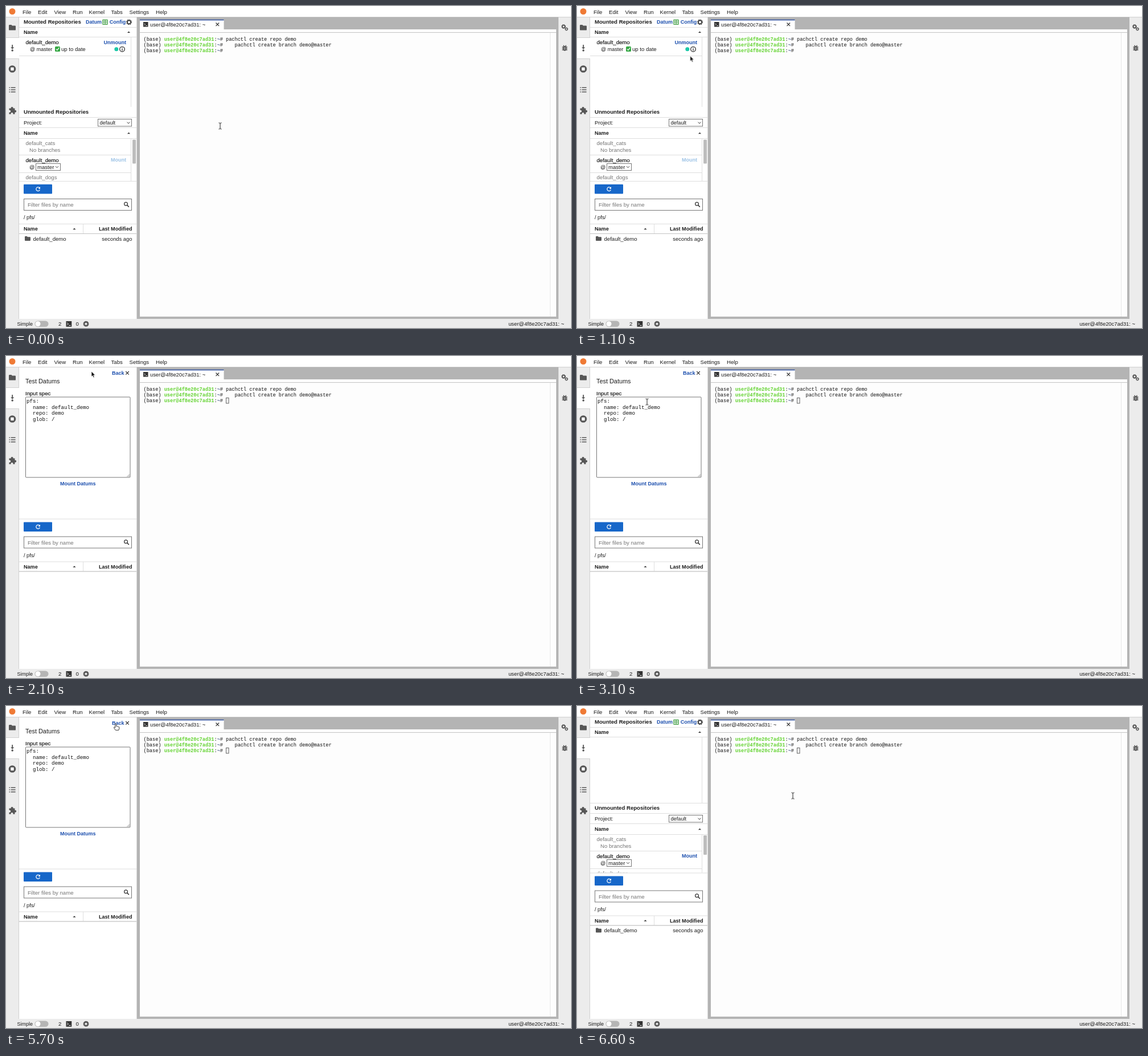
Write an HTML page that moves like this. It is 992x565 px and loops after 6.7 s.

```html
<!DOCTYPE html>
<html lang="en">
<head>
<meta charset="utf-8">
<title>Mounted repositories</title>
<style>
html, body { margin: 0; width: 100%; height: 100%; overflow: hidden; background: #fff; }
svg { display: block; width: 992px; height: 565px; }
text { font: 9.6px "Liberation Sans", Arial, sans-serif; fill: #1c1c1c; white-space: pre; }
.b { font-weight: 700; font-size: 9.1px; }
.title { font-weight: 700; font-size: 9.6px; }
.link { font-weight: 700; font-size: 9px; fill: #1c4fae; }
.off { fill: #9dc3e6; }
.dim { fill: #757575; }
.med { stroke: #1c1c1c; stroke-width: .2; }
.s92 { font-size: 9.2px; }
.end { text-anchor: end; }
.term text { font: 8.6px "Liberation Mono", monospace; fill: #111; }
.term .host { font-weight: 700; fill: #62d32f; }
.term .path { font-weight: 700; fill: #4a5f8f; }
.spec text { font: 9.17px "Liberation Mono", monospace; fill: #111; }
.rule { stroke: #dedede; fill: none; }
.icon { fill: #565656; }
.line { fill: none; stroke: #565656; stroke-width: 1.4; }
.box { fill: #fff; stroke: #777; }

/* one 6.7 s loop */
.before, .datums, .after, .beam, .arrow, .hand, .block, .hollow {
  animation: 6.7s step-end infinite; visibility: hidden;
}
.before { animation-name: before; }
.datums { animation-name: datums; }
.after { animation-name: after; }
.beam { animation-name: beam; }
.arrow { animation-name: arrow; }
.hand { animation-name: hand; }
.block { animation-name: block; }
.hollow { animation-name: hollow; }
.pointer { animation: move 6.7s ease-in-out infinite; }

@keyframes before { 0% { visibility: visible } 29.85%, 100% { visibility: hidden } }
@keyframes datums { 0%, 89.55%, 100% { visibility: hidden } 29.85% { visibility: visible } }
@keyframes after { 0% { visibility: hidden } 89.55%, 100% { visibility: visible } }
@keyframes beam {
  0%, 40.3%, 95.5%, 100% { visibility: visible }
  8.96%, 74.63% { visibility: hidden }
}
@keyframes arrow {
  0%, 20.15%, 40.3%, 80.6%, 95.5%, 100% { visibility: hidden }
  8.96%, 29.85%, 74.63%, 89.55% { visibility: visible }
}
@keyframes hand {
  0%, 29.85%, 89.55%, 100% { visibility: hidden }
  20.15%, 80.6% { visibility: visible }
}
@keyframes block { 0%, 11.94%, 100% { visibility: hidden } 2.99% { visibility: visible } }
@keyframes hollow { 0% { visibility: hidden } 23.88%, 100% { visibility: visible } }
@keyframes move {
  0%, 1.49% { transform: translate(376px, 210.5px) }
  11.94%, 14.93% { transform: translate(203px, 93px) }
  22.39%, 34.33% { transform: translate(150px, 27px) }
  43.28%, 49.25% { transform: translate(123px, 80.5px) }
  62.69%, 68.66% { transform: translate(97.5px, 108.5px) }
  82.09%, 92.54% { transform: translate(193px, 31px) }
  98.36%, 100% { transform: translate(379px, 157.5px) }
}
</style>
</head>
<body>
<svg viewBox="0 0 992 565">
<defs>
  <clipPath id="tall"><path d="M23 178h207v129H23z"/></clipPath>
  <clipPath id="short"><path d="M23 178h207v121.5H23z"/></clipPath>

  <g id="gear">
    <circle r="3.1" fill="none" stroke="#454545" stroke-width="1.9"/>
    <circle r="4.3" fill="none" stroke="#454545" stroke-width="1.3" stroke-dasharray="1.8 1.577"/>
  </g>
  <path id="folder" d="M0 1.2q0-1.2 1.2-1.2h3.3l1.4 1.4h4.900q1.200 0 1.200 1.200v5.800q0 1.200-1.200 1.200H1.200Q0 9.600 0 8.400z"/>
  <path id="up" d="M-2.600 1.300h5.200L0-1.300z" fill="#333"/>
  <path id="chevron" d="M-2.500-1.300 0 1.200l2.500-2.500" fill="none" stroke="#333"/>
  <path id="cross" d="M-2.800-2.800 2.800 2.800M2.800-2.800-2.800 2.800" stroke="#333" stroke-width="1.200"/>
  <g id="prompt">
    <rect width="8.500" height="8.500" fill="#333"/>
    <path d="M1.500 2.500 3.500 4.200l-2 1.800M4.300 6.500H7" fill="none" stroke="#fff" stroke-width=".8"/>
  </g>

  <g id="mountedHead">
    <text class="title" x="31" y="31.300">Mounted Repositories</text>
    <text class="link" x="140" y="31.300">Datum</text>
    <path d="M170 24.500h8v7.500h-8zM174 24.500v7.500M170 28.200h8" fill="none" stroke="#45a049" stroke-width="1.300"/>
    <text class="link" x="181.800" y="31.300">Config</text>
    <use href="#gear" x="216" y="28.300"/>
    <path class="rule" d="M23 37.500h206M23 54.500h206"/>
    <text class="b" x="31" y="49">Name</text>
    <use href="#up" x="215.500" y="45.800"/>
  </g>

  <g id="unmounted">
    <path class="rule" d="M23 177.500h206M23 195.500h206M23 213.500h206M23 232.500h206"/>
    <text class="title" x="31" y="189.300">Unmounted Repositories</text>
    <text x="31" y="207.500">Project:</text>
    <rect class="box" x="161.500" y="198.500" width="59" height="12.500"/>
    <text class="s92" x="164.500" y="208">default</text>
    <use href="#chevron" x="215" y="205"/>
    <text class="b" x="31" y="226">Name</text>
    <use href="#up" x="215.500" y="223"/>
    <path class="rule" d="M23 261.500h196M23 292.500h196M219.500 233v74"/>
    <text class="dim" x="34.500" y="244.300">default_cats</text>
    <text class="dim" x="41" y="256">No branches</text>
    <text class="med" x="34.500" y="273.500">default_demo</text>
    <text class="s92" x="41" y="286">@</text>
    <rect class="box" x="52.500" y="276.500" width="43" height="12"/>
    <text x="55" y="286">master</text>
    <use href="#chevron" x="89.500" y="282.500"/>
    <text class="dim" x="34.500" y="304.300">default_dogs</text>
  </g>

  <g id="files">
    <path class="rule" d="M23 307.500h206M23 382.500h206M23 399.500h206M135.500 382.500v17"/>
    <path d="M23 399.500h206" stroke="#c4c4c4"/>
    <rect x="31" y="313" width="50" height="16.500" rx="1" fill="#1767c9"/>
    <path d="M59 319.200A3.400 3.400 0 1 0 59.400 322.500" fill="none" stroke="#fff" stroke-width="1.200"/>
    <path d="M60 317.200v3.500h-3.500z" fill="#fff"/>
    <rect class="box" x="31.500" y="338.500" width="189" height="20"/>
    <text class="dim" x="38" y="352.200">Filter files by name</text>
    <circle cx="210.500" cy="347.300" r="2.900" fill="none" stroke="#333" stroke-width="1.200"/>
    <path d="m212.500 349.300 3.300 3.300" stroke="#333" stroke-width="1.500"/>
    <text class="s92" x="31" y="374">/ pfs/</text>
    <text class="b" x="31" y="394">Name</text>
    <use href="#up" x="120" y="391"/>
    <text class="b end" x="221.500" y="394">Last Modified</text>
  </g>
  <g id="fileRow">
    <use href="#folder" class="icon" transform="translate(33 404) scale(.83)"/>
    <text x="47.500" y="411.500">default_demo</text>
    <text class="end" x="221.500" y="411.500" style="font-size:9.400px">seconds ago</text>
  </g>
</defs>

<!-- menu bar -->
<circle cx="11" cy="9.500" r="5.500" fill="#ef7a35"/>
<text x="29" y="13.800">File</text>
<text x="56" y="13.800">Edit</text>
<text x="84.500" y="13.800">View</text>
<text x="117" y="13.800">Run</text>
<text x="145.500" y="13.800">Kernel</text>
<text x="184.500" y="13.800">Tabs</text>
<text x="216.500" y="13.800">Settings</text>
<text x="263" y="13.800">Help</text>

<!-- side bars and status bar -->
<path d="M0 19.500h23V549H0zM970 19.500h22V549h-22zM0 549h992v16H0z" fill="#ececec"/>
<path d="M0 19.500h992M22.500 19.500V56M22.500 92V549M0 55.500h22M0 92.500h22" stroke="#d0d0d0"/>
<path d="M0 56h23v36H0z" fill="#fff"/>
<use href="#folder" class="icon" x="5" y="33"/>
<g class="icon">
  <path d="M10.300 68h1.800v4.500h2.200l-3.100 3.200-3.100-3.200h2.200z"/>
  <circle cx="11.200" cy="78" r="1.800"/>
  <circle cx="11" cy="110.500" r="6.300"/>
  <rect x="8.300" y="107.800" width="5.400" height="5.400" rx=".6" fill="#fff"/>
  <path d="M5.500 179.500h3.200a2 2 0 1 1 3.800 0h3v3.300a2 2 0 1 1 0 3.800v3.200h-3.200a2 2 0 1 0-3.600 0H5.500v-3.300a2 2 0 1 0 0-3.700z"/>
</g>
<path class="line" d="M5.500 143.200h1.600m1.500 0h8M5.500 147h1.600m1.500 0h8M5.500 150.800h1.600m1.500 0h8"/>
<use href="#gear" transform="translate(979 36) scale(.78)"/>
<use href="#gear" transform="translate(984 40.500) scale(.6)"/>
<g class="icon">
  <ellipse cx="981" cy="74.500" rx="3" ry="4.300"/>
  <path class="line" stroke-width="1.100" d="M976.500 72h9M976.500 74.500h9M976.500 77h9M978.500 69l1.500 2M983.500 69l-1.500 2"/>
  <path d="M979.700 73.300h2.600m-2.600 2.300h2.600" stroke="#eee" stroke-width=".9"/>
</g>
<text x="19.500" y="561" style="font-size:9px">Simple</text>
<rect x="50.500" y="552.500" width="24" height="10.500" rx="5.200" fill="#b5b5b5"/>
<circle cx="56" cy="557.700" r="4.500" fill="#fff"/>
<text x="92" y="561">2</text>
<use href="#prompt" transform="translate(105.500 553) scale(1.150)"/>
<text x="122.500" y="561">0</text>
<rect x="137.200" y="554.500" width="6.600" height="6.600" rx="1" fill="none" stroke="#333" stroke-width="1.300"/>
<path d="M139.500 552.800v10m2.200-10v10M135.500 556.700h10m-10 2.300h10" stroke="#333" stroke-width=".9"/>
<rect x="139" y="556.300" width="3" height="3" fill="#ececec"/>
<text class="end" x="980" y="561" style="font-size:9.400px">user@4f8e20c7ad31: ~</text>

<!-- terminal dock -->
<path d="M229.500 19.500H970V549H229.500z" fill="#b4b4b4"/>
<path d="M235 41h731v504H235z" fill="#fdfdfd"/>
<path d="M235 24h147.500v18H235z" fill="#fff"/>
<path d="M235 24.500h147.500" stroke="#2d4f9e" stroke-width="1.600"/>
<path d="M235 46.500h731" stroke="#c4c4c4"/>
<path d="M955.500 47v498" stroke="#e6e6e6"/>
<use href="#prompt" x="241" y="28"/>
<text x="253" y="35.800" style="font-size:9.300px">user@4f8e20c7ad31: ~</text>
<use href="#cross" x="371.300" y="32.300"/>
<g class="term">
  <g id="ps">
    <text x="241.500" y="60.700">(base)</text>
    <text class="host" x="277.700" y="60.700">user@4f8e20c7ad31</text>
    <text x="365.500" y="60.700">:<tspan class="path">~</tspan>#</text>
  </g>
  <use href="#ps" y="10.300"/>
  <use href="#ps" y="20.600"/>
  <text x="386" y="60.700">pachctl create repo demo</text>
  <text x="401.500" y="71">pachctl create branch demo@master</text>
  <rect class="block" x="386" y="73" width="5.200" height="10.500" fill="#616161"/>
  <rect class="hollow" x="386.500" y="73.500" width="4.500" height="9.500" fill="none" stroke="#616161"/>
</g>

<!-- repository list with one mounted entry -->
<g class="before">
  <use href="#mountedHead"/>
  <path class="rule" d="M23 87.500h196M219.500 55v122"/>
  <text class="med" x="34.500" y="67.300">default_demo</text>
  <text class="link end" x="211" y="67">Unmount</text>
  <text x="42" y="79" style="font-size:9px">@ master</text>
  <rect x="86" y="71" width="9" height="9" rx="1.500" fill="#36a845"/>
  <path d="m88 75.600 1.900 2 3.300-4.400" fill="none" stroke="#fff" stroke-width="1.300"/>
  <text x="97" y="79">up to date</text>
  <circle cx="193.800" cy="75.800" r="3.500" fill="#1dc9a9"/>
  <circle cx="204" cy="75.800" r="4.300" fill="none" stroke="#222" stroke-width="1.200"/>
  <path d="M204 73v1.200m0 .8v3.400" stroke="#222" stroke-width="1.200"/>
  <g clip-path="url(#tall)">
    <use href="#unmounted"/>
    <text class="link off end" x="211" y="273">Mount</text>
    <rect x="222" y="234.500" width="6" height="42" rx="1" fill="#bdbdbd"/>
  </g>
  <use href="#files"/>
  <use href="#fileRow"/>
</g>

<!-- datum tester -->
<g class="datums">
  <text class="link" x="186" y="33">Back</text>
  <use href="#cross" x="213" y="29.800"/>
  <text x="34" y="48.300" style="font-size:10.900px">Test Datums</text>
  <text class="med" x="34" y="69">Input spec</text>
  <rect class="box" x="34.500" y="72" width="183.500" height="141" rx="1"/>
  <path d="m212.500 212 4.500-4.500m-2 4.500 2-2" stroke="#777" stroke-width=".8"/>
  <g class="spec">
    <text x="36" y="82">pfs:</text>
    <text x="47" y="92.700">name: default_demo</text>
    <text x="47" y="103.400">repo: demo</text>
    <text x="47" y="114.100">glob: /</text>
  </g>
  <text class="link" x="95" y="227.300">Mount Datums</text>
  <use href="#files" y="-21.500"/>
</g>

<!-- repository list, nothing mounted -->
<g class="after">
  <use href="#mountedHead"/>
  <path class="rule" d="M219.500 55v115M23 170.500h206"/>
  <g transform="translate(0 -7)">
    <g clip-path="url(#short)">
      <use href="#unmounted"/>
      <text class="link end" x="211" y="273">Mount</text>
      <rect x="222" y="234" width="6" height="34" rx="1" fill="#bdbdbd"/>
    </g>
  </g>
  <use href="#files" y="-14.500"/>
  <use href="#fileRow" y="-14.500"/>
</g>

<!-- mouse pointer -->
<g class="pointer">
  <g class="beam" fill="none">
    <path d="M-2.500-5.500Q0-5.500 0-4V4Q0 5.500-2.500 5.500M2.500-5.500Q0-5.500 0-4M0 4Q0 5.500 2.500 5.500" stroke="#222"/>
  </g>
  <path class="arrow" d="M0 0v9.300l2.100-1.900 1.500 3.500 1.600-.7-1.500-3.400h2.900z" fill="#111" stroke="#fff" stroke-width=".7"/>
  <path class="hand" d="M-1.300 1.200Q-1.300 0-.3 0T.8 1.200V4.600q1.200-.6 1.800.4 1.200-.5 1.700.5 1.600-.3 1.600 1.200 0 2.300-1.200 5H-.4Q-1-9.900-1-9.900" visibility="hidden" display="none"/>
  <path class="hand" d="M-1.300 1.200Q-1.300 0-.3 0T.8 1.200v3.400q1.200-.6 1.800.4 1.200-.5 1.700.5 1.600-.3 1.600 1.300 0 2.200-1.100 4.600H-.6L-3.400 7.600q-.8-1.200.2-1.500.8-.2 1.900 1.100z" fill="#fff" stroke="#222" stroke-width=".9"/>
</g>
</svg>
</body>
</html>
```
